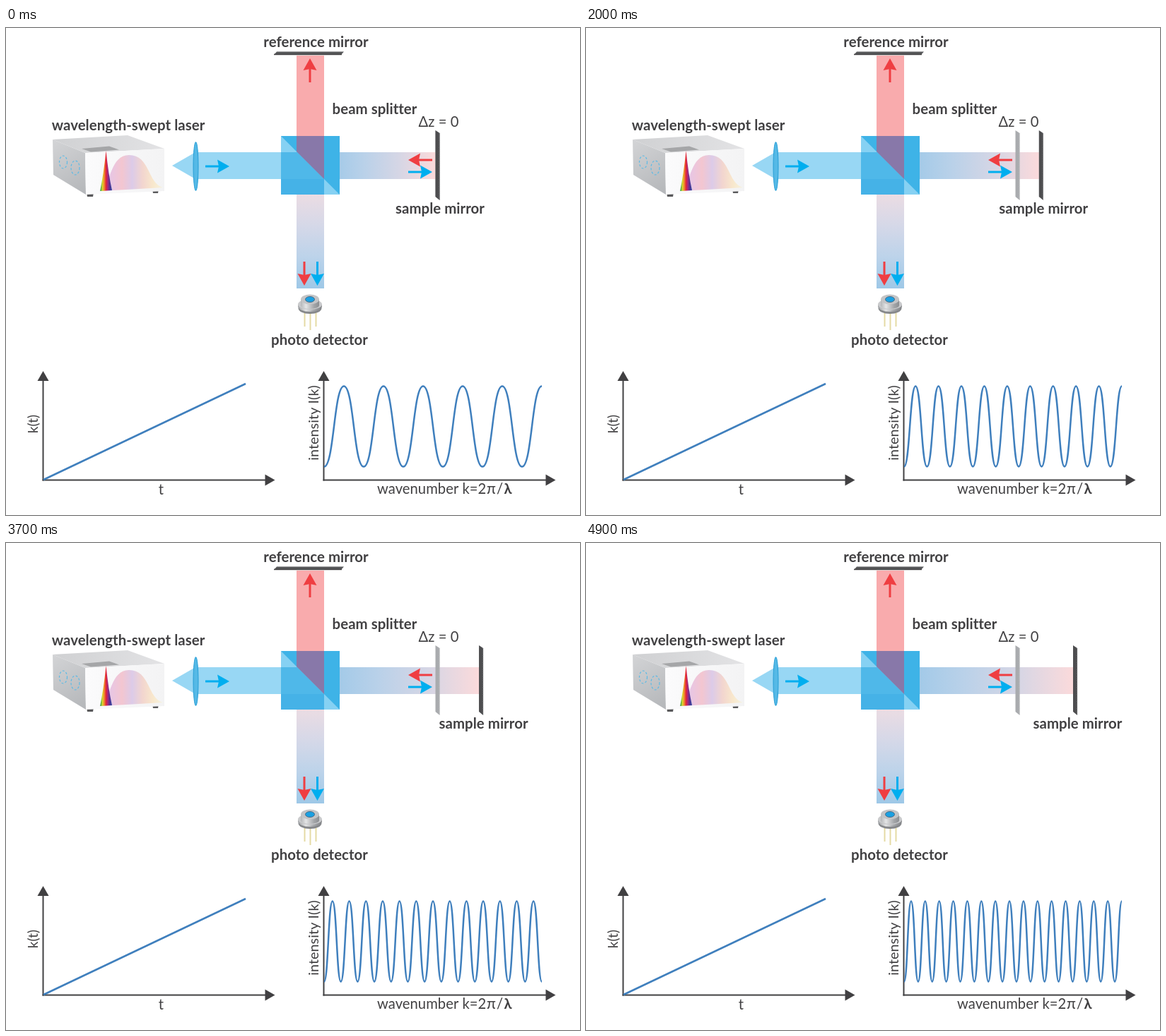
An HTML page with a canvas for the animation above (5 s loop, 812 by 690 pixels).

```html
<!DOCTYPE html>
<html lang="en">
<head>
<meta charset="utf-8">
<title>Swept-source interferometer</title>
<style>
  html, body { margin: 0; width: 100%; height: 100%; overflow: hidden; background: #fff; }
  canvas { display: block; width: 812px; height: 690px; }
</style>
</head>
<body>
<canvas id="stage" width="812" height="690"></canvas>
<script>
const c = document.getElementById('stage').getContext('2d');
const INK = '#414042', RED = '#ef3e42', BLUE = '#00aeef', CURVE = '#3f7fbd';
const FRAME = 100, FRAMES = 50, TRAVEL = 81.5, STEPS = 20;

function poly(fill, ...p) {
  c.beginPath();
  for (let i = 0; i < p.length; i += 2) c.lineTo(p[i], p[i + 1]);
  c.closePath();
  c.fillStyle = fill;
  c.fill();
}

function rect(fill, x, y, w, h) {
  c.fillStyle = fill;
  c.fillRect(x, y, w, h);
}

function oval(fill, x, y, rx, ry, stroke) {
  c.beginPath();
  c.ellipse(x, y, rx, ry, 0, 0, Math.PI * 2);
  if (fill) { c.fillStyle = fill; c.fill(); }
  if (stroke) { c.strokeStyle = stroke; c.stroke(); }
}

function line(color, width, x1, y1, x2, y2) {
  c.strokeStyle = color;
  c.lineWidth = width;
  c.beginPath();
  c.moveTo(x1, y1);
  c.lineTo(x2, y2);
  c.stroke();
}

function ramp(x1, y1, x2, y2, ...colors) {
  const g = c.createLinearGradient(x1, y1, x2, y2);
  colors.forEach((k, i) => g.addColorStop(i / (colors.length - 1), k));
  return g;
}

function text(s, x, y, { bold = false, size = 20.2, align = 'center', turn = 0 } = {}) {
  c.save();
  c.translate(x, y);
  c.rotate(turn);
  c.font = `${bold ? 700 : 400} ${size}px Lato, "Open Sans", sans-serif`;
  c.letterSpacing = '0.05px'; // also turns ligatures off
  c.textAlign = align;
  c.fillStyle = INK;
  c.fillText(s, 0, 0);
  c.restore();
}

const label = (s, x, y) => text(s, x, y, { bold: true, size: 20.4 });

function arrow(color, x, y, turn) {
  c.save();
  c.translate(x, y);
  c.rotate(turn * Math.PI / 2);
  line(color, 3, 0, 0, 22, 0);
  poly(color, 34, 0, 17, -9.5, 19, 0, 17, 9.5);
  c.restore();
}

function axes(x, y) {
  line(INK, 2, x, y + 1, x, 498);
  line(INK, 2, x - 1, y, x + 318, y);
  poly(INK, x, 486, x - 8, 500, x + 8, 500);
  poly(INK, x + 328, y, x + 314, y - 8, x + 314, y + 8);
}

function mirror(x, color, edge) {
  poly(color, x, 145, x + 6, 149, x + 6, 244, x, 239);
  c.setLineDash([1, 1.5]);
  line(edge, 1.5, x + 5.5, 149, x + 5.5, 243);
  c.setLineDash([]);
}

function laser() {
  poly('#5a5a5c', 114, 233, 124, 233, 123, 239, 115, 239);
  poly('#5a5a5c', 207, 228, 216, 228, 215, 234, 208, 234);
  poly(ramp(66, 158, 113, 236, '#d3d4d6', '#b4b6b9'), 66, 158, 112, 177, 113, 236, 67, 208);
  poly(ramp(66, 152, 223, 177, '#cfd0d2', '#e3e3e5'), 66, 158, 172, 152, 224, 171, 112, 177);
  poly('#a5a6a8', 107, 171, 146, 167.5, 160, 172.5, 120, 175.5);
  poly(ramp(112, 0, 224, 0, '#fbfbfc', '#f3f3f4'), 112, 177, 224, 171, 224, 231, 113, 236);

  c.lineWidth = 1.2;
  c.setLineDash([3, 2.5]);
  oval(null, 81, 190, 5.5, 9, '#5cbbe6');
  oval(null, 98, 198, 6, 10, '#5cbbe6');
  c.setLineDash([]);

  c.beginPath();
  c.moveTo(135, 231);
  c.bezierCurveTo(148, 220, 148, 180, 174, 180);
  c.bezierCurveTo(204, 180, 200, 220, 222, 226);
  c.closePath();
  c.fillStyle = ramp(135, 0, 222, 0, '#d9d1ee', '#e9c6e2', '#f3c6d0', '#dccbe8',
    '#f2d5cf', '#f8e7cc', '#f5f3df');
  c.fill();

  c.beginPath();
  c.moveTo(133, 231);
  c.quadraticCurveTo(138, 208, 141.5, 174);
  c.quadraticCurveTo(145, 208, 150, 230);
  c.closePath();
  c.fillStyle = ramp(134, 0, 149, 0, '#4aa84c', '#d9d52c', '#f08a2c', '#e3263a',
    '#a3297f', '#5b2f91', '#34449c');
  c.fill();
}

function splitter() {
  rect('#3eb3e7', 389, 153, 83, 83);
  poly('#86d1f3', 389, 153, 472, 236, 389, 236);
  poly('#4fb8e9', 389, 176, 412, 176, 450, 214, 389, 214);
  rect('#45b2e7', 389, 214, 61, 22);
  poly('#8878a9', 411, 153, 450, 153, 450, 214, 411, 175);
}

function detector() {
  for (const x of [422.5, 430.5, 438.5]) line('#e4daa4', 2, x, 400, x, x === 430.5 ? 428 : 423);
  const metal = ramp(413, 0, 447, 0, '#9b9da0', '#e4e5e6', '#a4a6a9', '#7f8184');
  oval('#86888b', 430, 397, 16.5, 8);
  oval(metal, 430, 394, 17, 8);
  oval('#c9cacc', 430, 391.5, 17, 7.5);
  rect(metal, 417, 384, 26, 9);
  oval(metal, 430, 393, 13, 5);
  oval('#c3c4c6', 430, 384.5, 13, 7);
  c.lineWidth = 1;
  oval('#1ba0e2', 430, 384.5, 6.5, 4, '#4c6c86');
}

function optics(shift) {
  const mx = 607.5 + shift;

  // reference arm
  rect('#f9abad', 411, 39, 39, 114);
  poly('#58595b', 379, 38, 383, 33.5, 478, 33.5, 474, 38);
  line(INK, 1.5, 379, 37.5, 475, 37.5);
  arrow(RED, 430, 77, -1);

  // source arm
  poly('#98d7f4', 235, 195, 268, 176, 268, 214);
  rect('#98d7f4', 268, 176, 121, 38);
  c.lineWidth = 1;
  oval('#55b9e6', 268.5, 196, 3.5, 34.5, '#259dd6');
  arrow(BLUE, 282, 196, 0);

  // sample arm
  rect(ramp(455, 0, mx, 0, '#9dc8e8', '#b9d1e9', '#d6d6e5', '#fbdadb'), 472, 176, mx - 472, 38);
  mirror(607.5, '#a9abae', '#bcbec0');
  mirror(mx, '#4d4d4f', '#77787b');
  arrow(RED, 603, 187, 2);
  arrow(BLUE, 569, 204, 0);

  // detector arm
  rect(ramp(0, 236, 0, 369, '#ebdce3', '#d5d8e8', '#bcd3ea', '#9ec8e7'), 411, 236, 39, 133);
  splitter();
  arrow(RED, 422, 331, 1);
  arrow(BLUE, 440.5, 331, 1);
  detector();
  laser();

  label('reference mirror', 438.5, 27);
  label('beam splitter', 521.5, 122);
  label('wavelength-swept laser', 173, 145);
  label('photo detector', 443.5, 449);
  label('sample mirror', 614 + shift, 263);
  text('Δz = 0', 612, 140);
}

// wave of smooth half cycles, each one a symmetric S-curve
function wave(x, low, high, width, cycles) {
  const half = width / (2 * cycles), mid = half / 2;
  c.beginPath();
  c.moveTo(x, low);
  for (let n = 0; n < 2 * cycles; n++) {
    const [from, to] = n % 2 ? [high, low] : [low, high];
    const left = x + n * half;
    c.bezierCurveTo(left + mid, from, left + mid, to, left + half, to);
  }
  c.strokeStyle = CURVE;
  c.lineWidth = 2.5;
  c.stroke();
}

function charts(cycles) {
  axes(52.5, 640.5);
  line(CURVE, 2.5, 53, 640, 339, 504);
  text('t', 219.5, 661);
  text('k(t)', 45, 561, { turn: -Math.PI / 2, size: 19 });

  axes(449.5, 640.5);
  wave(450, 621.5, 507.5, 308, cycles);
  text('intensity I(k)', 442, 559.5, { turn: -Math.PI / 2, size: 19.8 });
  text('wavenumber', 525, 660, { align: 'left' });
  text('k=2', 645.5, 660, { align: 'left' });
  text('π', 686.5, 660, { size: 21 });
  text('/', 698.5, 660);
  text('λ', 710, 660, { bold: true });
}

function draw(now) {
  const i = Math.floor(now / FRAME) % FRAMES;
  const p = i / (FRAMES - 1);
  rect('#fff', 0, 0, 812, 690);
  optics(TRAVEL * p);
  // the fringe count grows in half cycles
  charts(5.5 + Math.floor(STEPS * p + 1e-6) / 2);
}

const start = performance.now();
function tick() {
  draw(performance.now() - start);
  requestAnimationFrame(tick);
}
tick();
</script>
</body>
</html>
```
